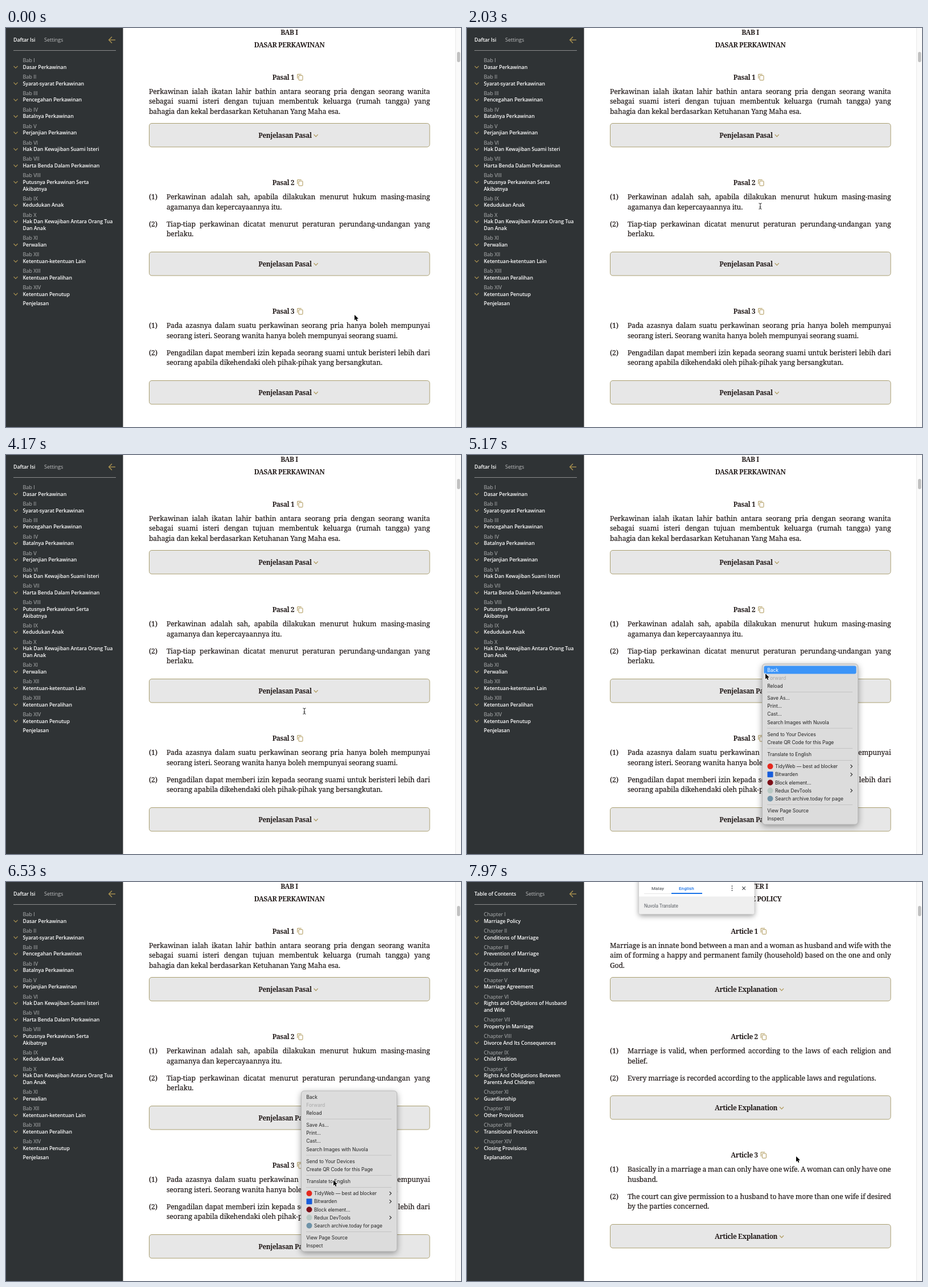
An HTML page with a canvas for the animation above (8000 ms loop, 799x701 px).

```html
<!DOCTYPE html>
<html lang="en">
<head>
<meta charset="utf-8">
<title>Translate a page</title>
<style>
html, body { margin: 0; width: 799px; height: 701px; overflow: hidden; background: #fff; }
canvas { display: block; width: 799px; height: 701px; }
</style>
</head>
<body>
<canvas id="stage"></canvas>
<script>
const W = 799, H = 701, LOOP = 8000;
const canvas = document.getElementById('stage');
const dpr = window.devicePixelRatio || 1;
canvas.width = W * dpr;
canvas.height = H * dpr;
const ctx = canvas.getContext('2d');

const INK = '#221a19', GOLD = '#ab9350', MID = 497.5;
// font, letter spacing, extra stroke weight
const STYLES = {
  body: ['12.2px "Noto Serif", serif', -0.13, 0.2],
  head: ['bold 11.8px "Noto Serif", serif', -0.38],
  item: ['600 8.9px "Open Sans", sans-serif', -0.08],
  label: ['9.2px "Open Sans", sans-serif', -0.1],
  menu: ['8.5px Inter, sans-serif', -0.04],
  tab: ['500 8px Roboto, sans-serif', 0.1],
  brand: ['8.2px Roboto, sans-serif', -0.1]
};
const ROMAN = 'I II III IV V VI VII VIII IX X XI XII XIII XIV'.split(' ');

const INDONESIAN = {
  tabs: ['Daftar Isi', 'Settings', 67],
  chapter: 'Bab ', article: 'Pasal ', button: 'Penjelasan Pasal', end: 'Penjelasan',
  title: ['BAB I', 'DASAR PERKAWINAN'],
  toc: ['Dasar Perkawinan', 'Syarat-syarat Perkawinan', 'Pencegahan Perkawinan',
    'Batalnya Perkawinan', 'Perjanjian Perkawinan', 'Hak Dan Kewajiban Suami Isteri',
    'Harta Benda Dalam Perkawinan', 'Putusnya Perkawinan Serta|Akibatnya',
    'Kedudukan Anak', 'Hak Dan Kewajiban Antara Orang Tua|Dan Anak', 'Perwalian',
    'Ketentuan-ketentuan Lain', 'Ketentuan Peralihan', 'Ketentuan Penutup'],
  articles: [
    ['Perkawinan ialah ikatan lahir bathin antara seorang pria dengan seorang wanita|sebagai suami isteri dengan tujuan membentuk keluarga (rumah tangga) yang|bahagia dan kekal berdasarkan Ketuhanan Yang Maha esa.'],
    ['Perkawinan adalah sah, apabila dilakukan menurut hukum masing-masing|agamanya dan kepercayaannya itu.',
      'Tiap-tiap perkawinan dicatat menurut peraturan perundang-undangan yang|berlaku.'],
    ['Pada azasnya dalam suatu perkawinan seorang pria hanya boleh mempunyai|seorang isteri. Seorang wanita hanya boleh mempunyai seorang suami.',
      'Pengadilan dapat memberi izin kepada seorang suami untuk beristeri lebih dari|seorang apabila dikehendaki oleh pihak-pihak yang bersangkutan.']
  ]
};
const ENGLISH = {
  tabs: ['Table of Contents', 'Settings', 103],
  chapter: 'Chapter ', article: 'Article ', button: 'Article Explanation', end: 'Explanation',
  title: ['CHAPTER I', 'MARRIAGE POLICY'],
  toc: ['Marriage Policy', 'Conditions of Marriage', 'Prevention of Marriage',
    'Annulment of Marriage', 'Marriage Agreement', 'Rights and Obligations of Husband|and Wife',
    'Property in Marriage', 'Divorce And Its Consequences', 'Child Position',
    'Rights And Obligations Between|Parents And Children', 'Guardianship',
    'Other Provisions', 'Transitional Provisions', 'Closing Provisions'],
  articles: [
    ['Marriage is an innate bond between a man and a woman as husband and wife with the|aim of forming a happy and permanent family (household) based on the one and only|God.'],
    ['Marriage is valid, when performed according to the laws of each religion and|belief.',
      'Every marriage is recorded according to the applicable laws and regulations.'],
    ['Basically in a marriage a man can only have one wife. A woman can only have one|husband.',
      'The court can give permission to a husband to have more than one wife if desired|by the parties concerned.']
  ]
};

// '-' separator, '!' disabled, '>' submenu, '#rgb' plain icon
const MENU = [
  ['Back'], ['Forward', '!'], ['Reload'], '-',
  ['Save As...'], ['Print...'], ['Cast...'], ['Search Images with Nuvola'], '-',
  ['Send to Your Devices'], ['Create QR Code for this Page'], '-',
  ['Translate to English'], '-',
  ['TidyWeb — best ad blocker', '>', '#e5291f'], ['Bitwarden', '>', '#175ddc', 'square'],
  ['Block element...', '', '#7d1019'], ['Redux DevTools', '>', '#b9c9c4'],
  ['Search archive.today for page', '', '#6f93a8'], '-',
  ['View Page Source'], ['Inspect']
];

// time, x, y of the pointer
const PATH = [
  [0, 612, 504], [450, 608, 502], [930, 597, 497], [1730, 553, 396], [2030, 515, 313],
  [2600, 508, 330], [3050, 516, 372], [3430, 519, 396], [3800, 577, 425], [4170, 524, 450],
  [4680, 517, 366], [4900, 518, 368], [5170, 524, 384], [5700, 560, 593], [6150, 574, 531],
  [6530, 575, 524], [6750, 576, 521], [7030, 580, 498], [7570, 578, 482], [8000, 578, 482]
];

function pointer(t) {
  let i = 0;
  while (i < PATH.length - 2 && t >= PATH[i + 1][0]) i++;
  const a = PATH[i], b = PATH[i + 1], span = b[0] - a[0], u = (t - a[0]) / span;
  const slope = (k, d) => {
    const p = PATH[k - 1], n = PATH[k + 1];
    if (!p || !n || k >= PATH.length - 2) return 0;
    const l = (PATH[k][d] - p[d]) / (PATH[k][0] - p[0]);
    const r = (n[d] - PATH[k][d]) / (n[0] - PATH[k][0]);
    return l * r > 0 ? 2 * l * r / (l + r) : 0;
  };
  const at = d => {
    const u2 = u * u, u3 = u2 * u;
    return a[d] * (2 * u3 - 3 * u2 + 1) + b[d] * (3 * u2 - 2 * u3) +
      span * (slope(i, d) * (u3 - 2 * u2 + u) + slope(i + 1, d) * (u3 - u2));
  };
  return { x: at(1), y: at(2) };
}

function use(style) {
  ctx.font = STYLES[style][0];
  ctx.letterSpacing = STYLES[style][1] + 'px';
  ctx.wordSpacing = '0px';
}

function text(str, x, y, style, color, gap = 0) {
  use(style);
  ctx.wordSpacing = gap + 'px';
  ctx.fillStyle = ctx.strokeStyle = color;
  ctx.fillText(str, x, y);
  const weight = STYLES[style][2];
  if (weight) {
    ctx.lineWidth = weight;
    ctx.strokeText(str, x, y);
  }
}

function widthOf(str, style) {
  use(style);
  return ctx.measureText(str).width;
}

function justify(str, x, y, right) {
  const gap = (right - x - widthOf(str, 'body')) / (str.split(' ').length - 1);
  text(str, x, y, 'body', INK, gap);
}

function line(points, color, width) {
  ctx.beginPath();
  points.forEach(([x, y], i) => i ? ctx.lineTo(x, y) : ctx.moveTo(x, y));
  ctx.strokeStyle = color;
  ctx.lineWidth = width;
  ctx.stroke();
}

function box(x, y, w, h, r, fill, stroke) {
  ctx.beginPath();
  ctx.roundRect(x, y, w, h, r);
  if (fill) { ctx.fillStyle = fill; ctx.fill(); }
  if (stroke) { ctx.strokeStyle = stroke; ctx.lineWidth = 1; ctx.stroke(); }
}

function shadowBox(x, y, w, h, r, fill, blur) {
  ctx.save();
  ctx.shadowColor = 'rgba(0,0,0,.4)';
  ctx.shadowBlur = blur * dpr;
  ctx.shadowOffsetY = 3 * dpr;
  box(x, y, w, h, r, fill);
  ctx.restore();
}

function chevron(x, y) {
  line([[x - 3.5, y - 1.8], [x, y + 1.8], [x + 3.5, y - 1.8]], GOLD, 1.2);
}

function sidebar(page) {
  ctx.fillStyle = '#2f3335';
  ctx.fillRect(0, 0, 205.5, H);
  const [first, second, x2] = page.tabs;
  text(first, 13, 24.3, 'item', '#fff');
  text(second, x2, 24.3, 'label', '#bcbdbe');
  line([[192, 21], [181, 21]], GOLD, 1.4);
  line([[186, 15.6], [180.6, 21], [186, 26.4]], GOLD, 1.4);
  line([[13, 39.5], [193, 39.5]], '#8b8c8d', 1);
  let y = 56.6;
  page.toc.forEach((entry, i) => {
    text(page.chapter + ROMAN[i], 29.5, y + 3.4, 'label', '#b0b2b3');
    chevron(17, y + 12);
    const rows = entry.split('|');
    rows.forEach((row, k) => text(row, 29.5, y + 15 + k * 11.6, 'item', '#fff'));
    y += 28.9 + (rows.length - 1) * 11.6;
  });
  text(page.end, 29.5, y + 2.8, 'item', '#fff');
}

function copyIcon(x, y) {
  line([[x + .5, y + 2.5], [x + .5, y - 5], [x + 7.5, y - 5]], GOLD, 1);
  box(x + 2.7, y - 2.8, 7, 8.2, 1, null, GOLD);
}

function article(page, n, y) {
  const name = page.article + (n + 1);
  const w = widthOf(name, 'head'), x = MID - (w + 21) / 2;
  text(name, x, y + 4.3, 'head', INK);
  copyIcon(x + w + 5, y);
  y += 25.2;
  const paras = page.articles[n], list = paras.length > 1;
  const left = list ? 282 : 251;
  paras.forEach((para, i) => {
    if (i) y += 12.9;
    if (list) text('(' + (i + 1) + ')', 251, y + 4.2, 'body', INK);
    const rows = para.split('|');
    rows.forEach((row, k) => {
      if (k < rows.length - 1) justify(row, left, y + 4.2, 744.5);
      else text(row, left, y + 4.2, 'body', INK);
      y += 17.4;
    });
  });
  y = Math.round(y + (list ? 14.5 : 4.2)) - .5;
  box(251.5, y, 492.5, 41.5, 4.5, '#e7e7e7', '#aa9f70');
  const bw = widthOf(page.button, 'head'), bx = MID - (bw + 15) / 2;
  text(page.button, bx, y + 25, 'head', INK);
  chevron(bx + bw + 7.5, y + 21.5);
  return y + 104.2;
}

function content(page) {
  page.title.forEach((row, i) =>
    text(row, MID - widthOf(row, 'head') / 2, 11.8 + i * 22.6, 'head', INK));
  let y = 86.3;
  for (let n = 0; n < 3; n++) y = article(page, n, y);
  ctx.fillStyle = '#fafafa';
  ctx.fillRect(789, 0, 10, H);
  line([[789.5, 0], [789.5, H]], '#e9e9e9', 1);
  box(792, 42, 5.5, 18, 2.75, '#c1c1c1');
}

function contextMenu(p, alpha, blink) {
  ctx.save();
  ctx.globalAlpha = alpha;
  shadowBox(518.5, 367, 168, 282, 5, '#dcdcdc', 12);
  box(518.5, 367, 168, 282, 5, null, '#b9b9b9');
  let y = 377.4;
  for (const row of MENU) {
    if (row === '-') {
      line([[527, y - 3.5], [677, y - 3.5]], '#c3c3c3', 1);
      y += 7;
      continue;
    }
    const [name, flag, icon, shape] = row;
    const hot = !blink && flag !== '!' && p.x > 517 && Math.abs(p.y - y) < 7.1;
    const color = flag === '!' ? '#a9a9a9' : hot ? '#fff' : '#232323';
    if (hot) box(521.5, y - 7, 162, 14, 3, '#3b94f8');
    if (icon) box(527.5, y - 5, 10, 10, shape ? 1 : 5, icon);
    text(name, icon ? 541 : 527.3, y + 3.1, 'menu', color);
    if (flag === '>') line([[673.5, y - 3], [676.5, y], [673.5, y + 3]], color, 1.1);
    y += 14.17;
  }
  ctx.restore();
}

function popup(alpha) {
  ctx.save();
  ctx.globalAlpha = alpha;
  shadowBox(302, -10, 202.5, 66.5, 3, '#efefef', 10);
  ctx.fillStyle = '#fff';
  ctx.fillRect(302, 0, 202.5, 25.5);
  line([[311, 20.5], [413, 20.5]], '#e6e6e6', 1);
  line([[359, 20], [413, 20]], '#1a73e8', 1.8);
  text('Malay', 324, 13.6, 'tab', '#5f6368');
  text('English', 372, 13.6, 'tab', '#1a73e8');
  for (const y of [7.3, 11, 14.7]) box(464.5, y - 1, 2, 2, 1, '#4b4f53');
  line([[483.3, 8.2], [488.9, 13.8]], '#4b4f53', 1.2);
  line([[488.9, 8.2], [483.3, 13.8]], '#4b4f53', 1.2);
  text('Nuvola Translate', 311, 44.8, 'brand', '#5f6368');
  ctx.restore();
}

function arrow({ x, y }) {
  ctx.beginPath();
  [[0, 0], [0, 9.6], [2.2, 7.6], [3.7, 11], [5.4, 10.2], [3.9, 7], [6.8, 6.8]]
    .forEach(([dx, dy]) => ctx.lineTo(x + dx, y + dy));
  ctx.closePath();
  ctx.strokeStyle = '#fff';
  ctx.lineWidth = 1.5;
  ctx.stroke();
  ctx.fillStyle = '#000';
  ctx.fill();
}

function beam({ x, y }) {
  for (const [color, width] of [['#fff', 2.2], ['#222', 1]]) {
    line([[x, y - 4], [x, y + 4]], color, width);
    line([[x - 2.6, y - 5], [x - 1, y - 5], [x, y - 4], [x + 1, y - 5], [x + 2.6, y - 5]], color, width);
    line([[x - 2.6, y + 5], [x - 1, y + 5], [x, y + 4], [x + 1, y + 5], [x + 2.6, y + 5]], color, width);
    line([[x - 1.4, y + 1.6], [x + 1.4, y + 1.6]], color, width);
  }
}

const clamp = v => Math.max(0, Math.min(1, v));

function draw(t) {
  ctx.setTransform(dpr, 0, 0, dpr, 0, 0);
  ctx.fillStyle = '#fff';
  ctx.fillRect(0, 0, W, H);
  const page = t < 7350 ? INDONESIAN : ENGLISH;
  const p = pointer(t);
  sidebar(page);
  content(page);
  if (t >= 4720 && t < 6780) {
    contextMenu(p, 1 - clamp((t - 6640) / 140), t > 6480 && t < 6580);
  }
  if (t > 6830) popup(clamp((t - 6830) / 100));
  if (t > 1650 && t < 4720) beam(p);
  else arrow(p);
}

const start = performance.now();
function tick() {
  draw((performance.now() - start) % LOOP);
  requestAnimationFrame(tick);
}
tick();
</script>
</body>
</html>
```
